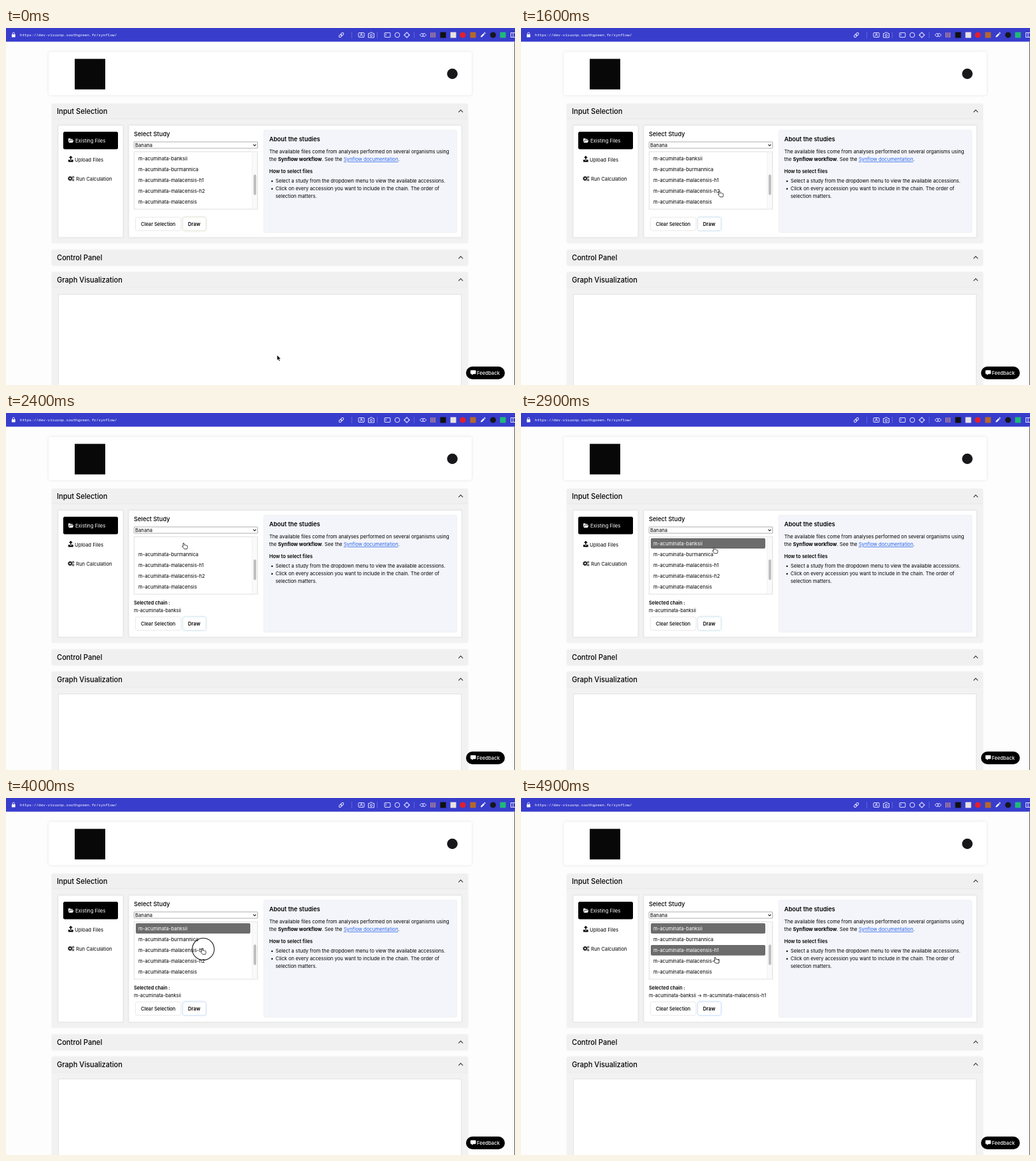
These frames come from a looping animation (800x561 px, 5000 ms). An HTML page:

```html
<!DOCTYPE html>
<html lang="en">
<head>
<meta charset="utf-8">
<title>Synflow file selection</title>
<style>
html, body { margin: 0; width: 100%; height: 100%; overflow: hidden; background: #fff; }
svg { display: block; width: 800px; height: 561px; }
text { font-family: Inter, "Liberation Sans", sans-serif; font-size: 7.7px; fill: #000; white-space: pre; }
.url { font-family: "Noto Sans Mono", "DejaVu Sans Mono", monospace; font-size: 6.05px; font-weight: 500; fill: #fff; }
.h1 { font-size: 11.1px; font-weight: 500; }
.h2 { font-size: 9.4px; font-weight: 500; }
.medium { font-weight: 500; }
.bold { font-weight: 600; }
.strong { font-size: 7.85px; font-weight: 700; }
.chain { font-size: 7.4px; }
.light { fill: #fff; }
.link { fill: #2563eb; text-decoration: underline; }
.panel { fill: #f2f2f2; filter: drop-shadow(0 .5px 1px #00000012); }
.card { fill: #fff; stroke: #e6e6e6; stroke-width: .8; filter: drop-shadow(0 .5px 1px #00000014); }
.chevron { fill: none; stroke: #333; stroke-width: 1.1; }
.icon { fill: none; stroke: #e6e6ff; stroke-width: 1; }
</style>
</head>
<body>
<svg id="stage" viewBox="0 0 800 561" xmlns="http://www.w3.org/2000/svg"></svg>
<script>
const LOOP = 5000, STEP = 100, SHIFT = 23;
const FIRST = { picked: 2300, filled: 2700 };
const SECOND = { picked: 4200, filled: 4500 };
const CLICKS = [[2100, 2300], [3900, 4100]];

// time, x, y of the pointer
const PATH = [
  [1300, 349.5, 307.5], [1900, 278, 214], [2000, 281, 209], [2500, 281, 209],
  [2900, 305, 216], [3200, 309.5, 238], [3500, 310, 241], [4300, 310, 241], [4900, 307, 255]
];
// time, r, g, b of the glow around the Draw button
const GLOW = [
  [0, 130, 150, 80], [900, 120, 165, 80], [2000, 50, 120, 240], [2400, 80, 160, 190],
  [2900, 75, 155, 180], [4000, 60, 135, 215], [4900, 50, 120, 240]
];
const ROWS = ["banksii", "burmannica", "malacensis-h1", "malacensis-h2", "malacensis"]
  .map(name => "m-acuminata-" + name);

const rect = (x, y, w, h, attrs = "") =>
  `<rect x="${x}" y="${y}" width="${w}" height="${h}" ${attrs}/>`;
const text = (x, y, body, cls = "", attrs = "") =>
  `<text x="${x}" y="${y}" class="${cls}" ${attrs}>${body}</text>`;
const chevron = y => `<path class="chevron" d="M711.3 ${y + 1.8}l3.4-3.4 3.4 3.4"/>`;
const heading = (y, title) =>
  rect(72, y, 654, 24, 'rx="3" fill="#f0f0f0"') +
  text(80, y + 16, title, "h1") + chevron(y + 11.5);

function toolbar() {
  const rule = x => rect(x, 6, .7, 10, 'fill="#7377e0"');
  const tile = (x, color) => rect(x - 4.5, 6.5, 9, 9, `fill="${color}"`);
  const dot = (x, color) => `<circle cx="${x}" cy="11" r="4.6" fill="${color}"/>`;
  return rect(0, 0, 800, 21.5, 'fill="#383dcc"') +
    rect(9, 10, 5.6, 4.6, 'rx=".6" fill="#fff"') +
    '<path class="icon" d="M10.2 10V8.7a1.6 1.6 0 0 1 3.2 0V10"/>' +
    text(22, 13.2, "https://dev-visusnp.southgreen.fr/synflow/", "url") +
    `<g class="icon">
      <g transform="rotate(-45 527 11)"><rect x="522.5" y="9.3" width="5" height="3.4" rx="1.7"/><rect x="526.5" y="9.3" width="5" height="3.4" rx="1.7"/></g>
      <rect x="554" y="7.5" width="9" height="7" rx="1"/><path d="M556 13q2.5-4 5 0"/><circle cx="558.5" cy="9.8" r="1"/>
      <path d="M569.5 8.5h2l1-1.5h3l1 1.5h2V15h-9z"/><circle cx="574" cy="11.5" r="1.7"/>
      <rect x="595" y="7.5" width="9" height="7" rx=".6"/><path d="M596.5 9.3l1.5 1.2-1.5 1.2"/>
      <circle cx="630" cy="11" r="3.4"/><path d="M630 6v3M630 13v3M625 11h3M632 11h3"/>
      <path d="M650.5 11l2.5-2.5h1.5V10h2V8.500h1.500l2.500 2.500-2.500 2.500h-1.500V12h-2v1.500H653z"/>
      <rect x="793.5" y="7.5" width="9" height="7"/><path d="M797 7.5v7"/>
    </g>
    <path d="M668 7v8M671 7v8M674 7v8" stroke="#e7a27e" stroke-width="1.3"/>
    <path d="M746 14.5l.6-2.3 4-4 1.7 1.7-4 4zM751.2 7.6l1-1 1.7 1.7-1 1z" fill="#fff"/>` +
    '<circle class="icon" cx="615" cy="11" r="3.8"/>' +
    rule(543) + rule(583) + rule(641) +
    tile(687, "#111") + tile(703, "#e8e4e0") + dot(718, "#e3202c") +
    tile(734, "#b5672b") + dot(765.5, "#17171d") + tile(781, "#20b87a");
}

function header() {
  return rect(67, 37.5, 665, 68, 'rx="4" fill="#fff" style="filter:drop-shadow(0 .5px 2px #0000001a)"') +
    rect(108, 48.5, 48, 48, 'fill="#080808"') +
    '<circle cx="701.5" cy="72" r="8.3" fill="#18181b"/>';
}

function sidebar() {
  return rect(82, 153, 102, 176, 'class="card" data-grow="176"') +
    rect(90, 163, 86, 27.5, 'rx="2.5"') +
    `<path fill="#fff" d="M98 180v-6.5h2.8l1 1h3v1.200h-4.800zM98.600 180.300l1.800-3.900h6l-1.800 3.900z"/>
     <path d="M101 207.200v-3.200h-2.200l3-3.200 3 3.200h-2.200v3.200z"/>
     <path d="M98 207h2.400v1.200h2.800V207h2.400v3.500H98z"/>
     <g fill="none" stroke="#111"><circle cx="100.8" cy="236.5" r="2.1" stroke-width="1.6"/>
     <circle cx="100.8" cy="236.5" r="3.3" stroke-dasharray="1.4 1.2"/>
     <circle cx="105.6" cy="234.3" r="1.2"/><circle cx="105.6" cy="239" r="1.2"/></g>` +
    text(109, 179.7, "Existing Files", "light") +
    text(108, 209.7, "Upload Files") +
    text(110, 239.5, "Run Calculation");
}

function picker() {
  const rows = ROWS.map((name, i) => {
    const y = 196.7 + i * 17.2;
    return rect(204, y, 180, 16.4, `id="fill${i}" rx="2" fill="#6c6c6c" visibility="hidden"`) +
      text(208, y + 10.9, name, "", `id="row${i}"`);
  }).join("");
  return rect(193, 153, 523, 176, 'class="card" data-grow="176"') +
    text(201, 170.3, "Select Study", "h2") +
    rect(201.2, 179, 194.3, 10, 'rx="1" fill="#fff" stroke="#8a8a8a" stroke-width=".7"') +
    text(203, 187, "Banana") +
    '<path class="chevron" d="M388.6 183l2.2 2.2 2.2-2.2"/>' +
    rect(201.3, 194.3, 194, 90.5, 'fill="#fff" stroke="#d2d2d2" stroke-width=".7"') +
    rect(387, 194.7, 8, 89.8, 'fill="#fafafa" stroke="#e8e8e8" stroke-width=".6"') +
    rect(389.2, 230.3, 4, 32.3, 'rx="2" fill="#bdbdbd"') + rows +
    '<g id="chain" visibility="hidden">' +
      text(201, 300.8, "Selected chain :", "chain bold") +
      text(201, 312.5, "", "chain", 'id="names"') + "</g>" +
    '<g data-move>' +
      rect(203.3, 297.3, 71.7, 21.2, 'rx="3" fill="#fff" stroke="#e4e4e4" stroke-width=".8"') +
      text(212, 310.8, "Clear Selection", "medium", 'style="font-size:7.5px"') +
      rect(278, 297.3, 36.3, 21.2, 'id="draw" rx="3" fill="#fff" stroke-width=".7"') +
      text(286, 310.8, "Draw", "bold") + "</g>";
}

function about() {
  const bullet = y => `<circle cx="418.2" cy="${y}" r="1.2"/>`;
  return rect(405.2, 160.7, 303.3, 160.5, 'data-grow="160.5" rx="2" fill="#f4f5fa" stroke="#eaecf2" stroke-width=".8"') +
    text(413.7, 178, "About the studies", "h2 bold") +
    text(413.7, 197.4, "The available files come from analyses performed on several organisms using") +
    text(413.7, 209.2, 'the <tspan class="strong">Synflow workflow</tspan>. See the <tspan class="link">Synflow documentation</tspan>.') +
    text(413.7, 228.3, "How to select files", "bold") +
    bullet(240.7) + text(423.8, 243.2, "Select a study from the dropdown menu to view the available accessions.") +
    bullet(252.7) + text(423.8, 255.2, "Click on every accession you want to include in the chain. The order of") +
    text(423.8, 267.2, "selection matters.");
}

function lowerPanels() {
  return "<g data-move>" +
    rect(72, 348.5, 654, 25, 'class="panel" rx="3"') + heading(349, "Control Panel") +
    rect(72, 383.5, 654, 210, 'class="panel" rx="3"') + heading(384, "Graph Visualization") +
    rect(72, 407.7, 654, .7, 'fill="#e6e6e6"') +
    rect(82.5, 418.5, 633, 175, 'fill="#fff" stroke="#dedede" stroke-width=".8"') + "</g>";
}

function overlay() {
  return rect(723, 532, 61, 20, 'rx="10"') +
    '<path fill="#fff" d="M731 537.7h6.500q1 0 1 1v4q0 1-1 1h-3l-2.200 2v-2H731q-1 0-1-1v-4q0-1 1-1z"/>' +
    text(740, 544.7, "Feedback", "light medium") +
    rect(799, 22, 1, 539, 'fill="#55555c"') +
    `<circle id="ring" r="17.3" fill="none" stroke="#111" stroke-width="1.1"/>
     <path id="arrow" d="M0 0V8.3L1.9 6.6 3.2 9.6 4.7 9 3.4 6.1H6z" fill="#000" stroke="#fff" stroke-width=".6"/>
     <path id="hand" d="M-2.8-4.2q.9-1.2 1.7 0L-.4-1.2q.9-.8 1.5.1 1-.6 1.500.3 1.200-.4 1.500.7.5 2.500-.5 4.800H-1Q-2.500 2.800-4 .7q-.2-1.200 1.500-.2z" fill="#fff" stroke="#111" stroke-width=".8" stroke-linejoin="round"/>`;
}

const $ = id => document.getElementById(id);
$("stage").innerHTML = rect(0, 0, 800, 561, 'fill="#fdfdfd"') + toolbar() + header() +
  rect(72, 119, 654, 219, 'class="panel" rx="3" data-grow="219"') +
  heading(119, "Input Selection") + rect(72, 142.5, 654, .7, 'fill="#e6e6e6"') +
  sidebar() + picker() + about() + lowerPanels() + overlay();

const growers = document.querySelectorAll("[data-grow]");
const movers = document.querySelectorAll("[data-move]");

function sample(keys, t) {
  const next = keys.findIndex(k => k[0] > t);
  if (next === 0) return keys[0].slice(1);
  if (next < 0) return keys[keys.length - 1].slice(1);
  const a = keys[next - 1], b = keys[next];
  const p = (t - a[0]) / (b[0] - a[0]);
  return a.slice(1).map((v, i) => v + (b[i + 1] - v) * p);
}

function show(id, on) {
  $(id).setAttribute("visibility", on ? "visible" : "hidden");
}

function render(t) {
  const shift = t >= FIRST.picked ? SHIFT : 0;
  growers.forEach(el => el.setAttribute("height", +el.dataset.grow + shift));
  movers.forEach(el => el.setAttribute("transform", `translate(0 ${shift})`));

  [[0, FIRST], [2, SECOND]].forEach(([i, event]) => {
    $("row" + i).style.fill = t >= event.picked ? "#fff" : "";
    show("fill" + i, t >= event.filled);
  });
  show("chain", shift > 0);
  $("names").textContent = ROWS[0] + (t >= SECOND.picked ? " → " + ROWS[2] : "");

  const glow = sample(GLOW, t < 900 ? 0 : t).map(Math.round).join();
  $("draw").setAttribute("stroke", `rgba(${glow},.2)`);
  $("draw").style.filter = `drop-shadow(0 0 1.8px rgba(${glow},.35))`;

  const [x, y] = t < 900 ? [426, 514] : sample(PATH, t);
  const overList = t >= 900 && y < 285;
  show("hand", overList);
  show("arrow", !overList);
  $(overList ? "hand" : "arrow").setAttribute("transform", `translate(${x} ${y})`);
  show("ring", CLICKS.some(([from, to]) => t >= from && t < to));
  $("ring").setAttribute("transform", `translate(${x} ${y - 3.5})`);
}

const start = performance.now();
function tick() {
  const t = (performance.now() - start) % LOOP;
  render(Math.floor(t / STEP) * STEP);
  requestAnimationFrame(tick);
}
tick();
</script>
</body>
</html>
```
